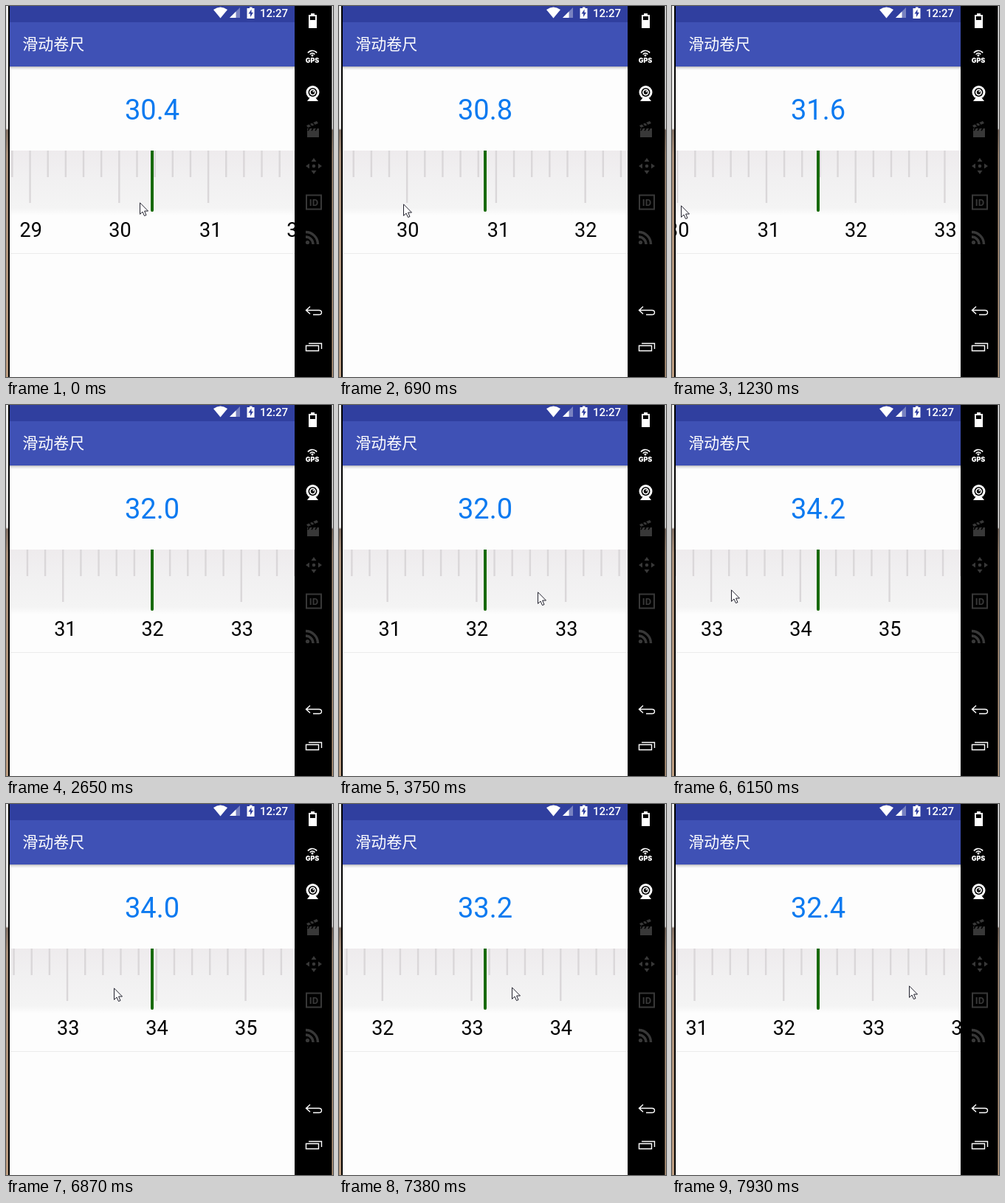
Write an HTML page with a canvas that moves like this. It is 443 px wide and 503 px high and loops after 8 s.

```html
<!DOCTYPE html>
<html lang="zh">
<head>
<meta charset="utf-8">
<title>滑动卷尺</title>
<style>
html, body { margin: 0; width: 100%; height: 100%; overflow: hidden; background: #000; }
canvas { display: block; width: 443px; height: 503px; }
</style>
</head>
<body>
<canvas id="stage" width="443" height="503"></canvas>
<script>
const ctx = document.getElementById('stage').getContext('2d');
const LOOP = 8000, LEFT = 5, RIGHT = 391, CENTER = 198, UNIT = 120.75, TOP = 196;

// The screen refreshes at a fixed rate, a little ahead of the clock.
const REFRESH = 134.4, LEAD = 33;

// Each drag adds an eased amount to the ruler value.
const START_VALUE = 30.37;
const drags = [
  { start: 0, span: 1811, amount: 1.63 },
  { start: 3586, span: 1405, amount: 2.2 },
  { start: 6454, span: 1819, amount: -2 }
];

// Turning points of the pointer: [time, x, y]
const pointerPath = [[0, 181, 266], [1210, 12, 270], [1400, -20, 270], [2554, -20, 298], [2822, 214, 248],
  [3091, 336, 253], [3495, 331, 253], [4570, 82, 255], [4838, 49, 257], [6182, 80, 250], [6854, 146, 249],
  [7930, 321, 246]];

const clamp = u => Math.min(1, Math.max(0, u));
const smooth = u => u * u * (3 - 2 * u);

function rulerValue(t) {
  return drags.reduce((v, d) => v + d.amount * smooth(clamp((t - d.start) / d.span)), START_VALUE);
}

function pointerAt(t) {
  const i = pointerPath.findIndex(p => p[0] > t);
  if (i < 0) return pointerPath[pointerPath.length - 1].slice(1);
  const [t0, x0, y0] = pointerPath[i - 1], [t1, x1, y1] = pointerPath[i];
  const u = (t - t0) / (t1 - t0);
  return [x0 + (x1 - x0) * u, y0 + (y1 - y0) * u];
}

function rect(x, y, w, h, color) {
  ctx.fillStyle = color;
  ctx.fillRect(x, y, w, h);
}

function path(d, fill, stroke, width = 1) {
  const p = new Path2D(d);
  if (fill) { ctx.fillStyle = fill; ctx.fill(p); }
  if (stroke) { ctx.strokeStyle = stroke; ctx.lineWidth = width; ctx.stroke(p); }
}

function text(str, x, y, font, color, align = 'left') {
  ctx.font = font;
  ctx.fillStyle = color;
  ctx.textAlign = align;
  ctx.fillText(str, x, y);
}

function arc(x, y, r, from, to, color, width) {
  ctx.beginPath();
  ctx.arc(x, y, r, from * Math.PI, to * Math.PI);
  ctx.strokeStyle = color;
  ctx.lineWidth = width;
  ctx.stroke();
}

function disc(x, y, r, color) {
  ctx.beginPath();
  ctx.arc(x, y, r, 0, 7);
  ctx.fillStyle = color;
  ctx.fill();
}

function gradient(y, h, stops) {
  const g = ctx.createLinearGradient(0, y, 0, y + h);
  stops.forEach(([p, c]) => g.addColorStop(p, c));
  return g;
}

function drawBackdrop() {
  const desk = gradient(0, 503, [[0, '#ececec'], [0.33, '#e4e2e0'], [0.335, '#806f63'], [0.4, '#a58d78'], [1, '#b99a7e']]);
  rect(0, 0, 443, 503, desk);
  rect(3, 0, 2, 503, '#000');
  rect(LEFT, 0, RIGHT - LEFT, 503, '#fdfdfd');
}

function drawBars() {
  rect(LEFT, 0, RIGHT - LEFT, 22, '#303f9f');
  rect(LEFT, 22, RIGHT - LEFT, 60, '#3f51b5');
  rect(LEFT, 82, RIGHT - LEFT, 5, gradient(82, 5, [[0, '#b4b4b8'], [0.4, '#e2e2e2'], [1, '#fdfdfd']]));
  text('滑动卷尺', 22.3, 58.6, '21px "Noto Sans CJK SC", "Noto Sans CJK", sans-serif', '#fff');
  path('M281 5 Q290.500 -2 300 5 L290.500 16.500 Z', '#fff');
  path('M317 2 V16 H303 Z', 'rgba(255,255,255,.35)');
  path('M311.500 7.500 V16 H303 Z', '#fff');
  path('M330 1.500 H333.500 V3 H336.500 V17 H326.500 V3 H330 Z', '#fff');
  path('M332.500 4.500 L328.500 10.500 H331 V15 L335 8.800 H332.500 Z', '#303f9f');
  text('12:27', 344, 15, '500 15px Roboto, sans-serif', '#fff');
}

function drawSidePanel() {
  const dim = '#383838', white = '#fff';
  rect(RIGHT, 0, 50.5, 503, '#000');
  // battery
  path('M413 10 H418 V12 H421 V30 H410 V12 H413 Z', white);
  rect(412, 14, 7, 5, '#000');
  // positioning
  arc(415, 68, 7.5, 1.2, 1.8, white, 1.7);
  arc(415, 68, 4, 1.2, 1.8, white, 1.6);
  disc(415, 67, 1.5, white);
  text('GPS', 415, 77, '900 9px Inter, sans-serif', white, 'center');
  // camera
  disc(415.5, 117, 9, white);
  disc(415.5, 117, 6, '#000');
  disc(415.5, 117, 4.4, white);
  disc(415.5, 117, 2.7, '#000');
  disc(416.5, 116, 1, white);
  path('M411 125 H420 L423 129 H408 Z', white);
  // clapper board
  rect(408, 166, 16, 12, dim);
  path('M407 162 L421 156 L423 159 L409 165 Z', dim);
  path('M411 160 l3 3 M415 158 l3 3 M411 166 l-2 3 M416 166 l-2 3 M421 166 l-2 3', null, '#000', 1.5);
  // move
  disc(417, 217, 2.3, dim);
  path('M417 206 l3.500 5 h-7 Z M417 228 l3.500 -5 h-7 Z M406 217 l5 -3.500 v7 Z M428 217 l-5 -3.500 v7 Z', dim);
  // identifier
  path('M407 256.500 H427 V275.500 H407 Z', null, dim, 2);
  text('ID', 417, 271, 'bold 13px Roboto, sans-serif', dim, 'center');
  // feed
  disc(408.5, 320.5, 2.6, dim);
  arc(406, 323, 10, 1.5, 2, dim, 3.4);
  arc(406, 323, 16.5, 1.5, 2, dim, 3.4);
  // navigation
  path('M412 407.500 L406.500 412.500 L412 417.500 M406.500 412.500 H424 Q427.500 412.500 427.500 415.500 Q427.500 418.500 424 418.500 H416', null, white, 1.4);
  path('M406.500 460.500 H423.500 V467.500 H406.500 Z M410 457.500 H427.500 V465', null, white, 1.4);
}

// Labels start half an ink width left of their tick.
function drawLabel(str, x) {
  ctx.font = '27px Roboto, sans-serif';
  ctx.textAlign = 'left';
  const m = ctx.measureText(str);
  const ink = m.actualBoundingBoxRight + m.actualBoundingBoxLeft;
  text(str, x - ink / 2, 313, ctx.font, '#000');
}

function drawRuler(value) {
  rect(LEFT, TOP, RIGHT - LEFT, 88, gradient(TOP, 88,
    [[0, '#eeebed'], [0.4, '#f1f0f1'], [0.88, '#f4f4f4'], [1, '#fdfdfd']]));
  rect(LEFT, 335, RIGHT - LEFT, 1, '#ececec');
  const first = Math.floor((value - 2) * 5), last = Math.ceil((value + 2) * 5);
  for (let n = first; n <= last; n++) {
    const x = CENTER + (n / 5 - value) * UNIT, whole = n % 5 === 0;
    rect(x - 1.2, TOP, 2.4, whole ? 71 : 36, '#dad7d9');
    if (whole) drawLabel(String(n / 5), x);
  }
  path(`M${CENTER} ${TOP} V277`, null, '#176a08', 4);
  disc(CENTER, 277, 2, '#176a08');
  text((Math.round(value * 5) / 5).toFixed(1), CENTER, 154, '38px Roboto, sans-serif', '#0c7af0', 'center');
}

function drawPointer(x, y) {
  ctx.save();
  ctx.translate(Math.round(x), Math.round(y));
  path('M.500 .800 V16.300 L4 13 L6.500 18.500 L9 17.500 L6.600 12 H11.500 Z', '#fff', '#22222e');
  ctx.restore();
}

function draw(time) {
  const t = Math.floor((time + LEAD) / REFRESH) * REFRESH;
  drawBackdrop();
  ctx.save();
  ctx.beginPath();
  ctx.rect(LEFT, 0, RIGHT - LEFT, 503);
  ctx.clip();
  drawBars();
  drawRuler(rulerValue(t));
  ctx.restore();
  drawSidePanel();
  drawPointer(...pointerAt(t));
}

const start = performance.now();
function frame() {
  draw((performance.now() - start) % LOOP);
  requestAnimationFrame(frame);
}
frame();
</script>
</body>
</html>
```
